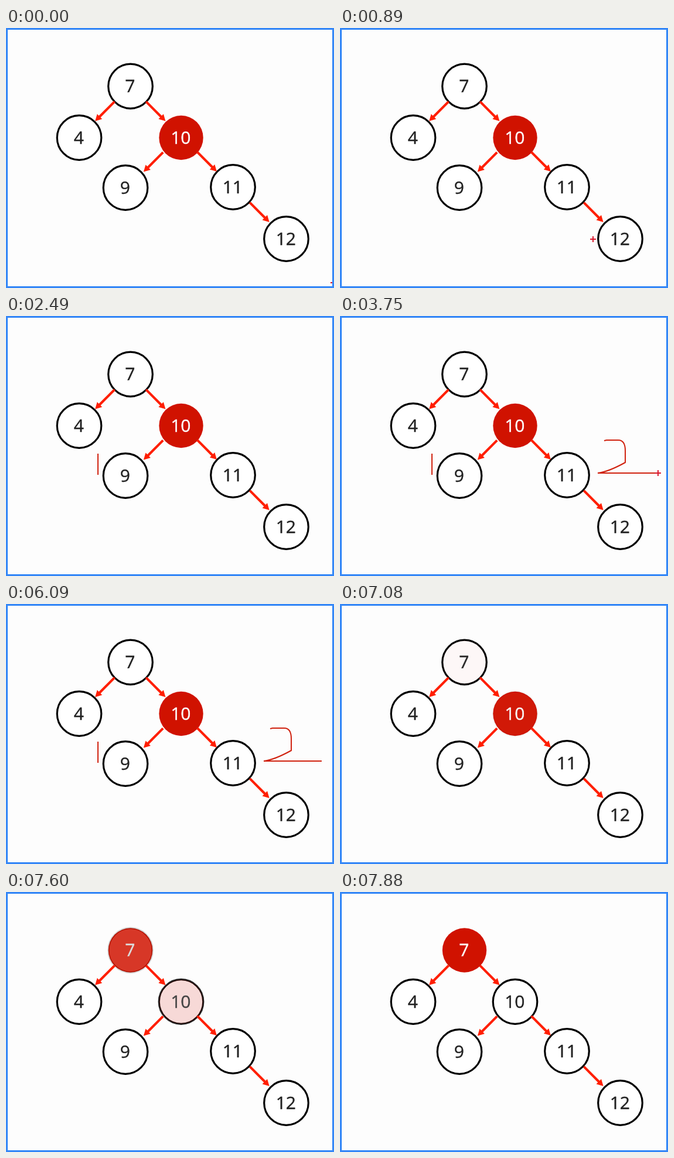
Write an HTML page with a canvas that moves like this. It is 560x442 px and loops after 8000 ms.

```html
<!DOCTYPE html>
<html lang="en">
<head>
<meta charset="utf-8">
<title>Tree rotation</title>
<style>
  html, body { margin: 0; width: 100%; height: 100%; overflow: hidden; background: #fdfdfd; }
  canvas { display: block; }
</style>
</head>
<body>
<canvas id="stage" width="560" height="442"></canvas>
<script>
const stage = document.getElementById('stage');
const ctx = stage.getContext('2d');
const layer = stage.cloneNode();
const back = layer.getContext('2d');

const LOOP = 8000, TICK = 50, WIPE = 7080;
const RED = '#d01200', ARROW = '#ff1e00', INK = '#d0220f';

const node = (label, x, y, parent) => ({ label, x, y, parent });
const seven = node('7', 212.5, 99);
const four = node('4', 125, 186.5, seven);
const ten = node('10', 299, 186.5, seven);
const nine = node('9', 204, 271.5, ten);
const eleven = node('11', 387.5, 270.5, ten);
const twelve = node('12', 478.5, 358.5, eleven);
const nodes = [seven, four, ten, nine, eleven, twelve];

function stroke(from, to, d) {
  const path = document.createElementNS('http://www.w3.org/2000/svg', 'path');
  path.setAttribute('d', d);
  return { from, to, shape: new Path2D(d), length: path.getTotalLength() };
}
const strokes = [
  stroke(2150, 2490, 'M157 234V270'),
  stroke(3150, 3710, 'M451 212L455 211H475Q487 211 487 229V249Q458 265 440 267H539')
];

// the cursor is visible from show to hide and glides from a to b around via
const glides = [
  { show: 0, start: 550, end: 1500, hide: 1500, a: [559, 433], via: [345, 305], b: [216, 241] },
  { show: 1500, start: 1500, end: 2050, hide: 2200, a: [216, 241], via: [180, 236], b: [157, 234] },
  { show: 2630, start: 2850, end: 3150, hide: 3150, a: [157, 271], via: [250, 20], b: [451, 212] },
  { show: 3750, start: 3750, end: 6090, hide: 6090, a: [543, 267], via: [543, 267], b: [543, 267] },
  { show: 6240, start: 6240, end: 6750, hide: 6750, a: [542, 267], via: [430, 430], b: [324, 167] }
];

const progress = (t, from, to) => Math.max(0, Math.min(1, (t - from) / (to - from)));

function drawNode({ label, x, y }, active) {
  ctx.beginPath();
  ctx.arc(x, y, active ? 37.7 : 37.8, 0, Math.PI * 2);
  ctx.fillStyle = active ? RED : '#fff';
  ctx.fill();
  if (!active) {
    ctx.lineWidth = 3.2;
    ctx.strokeStyle = '#000';
    ctx.stroke();
  }
  ctx.fillStyle = ctx.strokeStyle = active ? '#fff' : '#222';
  ctx.lineWidth = 0.4;
  ctx.fillText(label, x - 0.7, y + 10);
  ctx.strokeText(label, x - 0.7, y + 10);
}

// every link is a diagonal arrow centred between parent and child
function drawLink({ x, y, parent }) {
  const side = Math.sign(x - parent.x);
  ctx.save();
  ctx.translate((x + parent.x) / 2, (y + parent.y) / 2 - 1);
  ctx.rotate(side > 0 ? Math.PI / 4 : Math.PI * 3 / 4);
  ctx.fillStyle = ARROW;
  ctx.fillRect(-23.5, -2.1, 39, 4.2);
  ctx.beginPath();
  ctx.moveTo(23.5, 0);
  ctx.lineTo(12.5, -6);
  ctx.lineTo(12.5, 6);
  ctx.fill();
  ctx.restore();
}

function drawTree(active) {
  ctx.fillStyle = '#fdfdfd';
  ctx.fillRect(0, 0, 560, 442);
  ctx.font = '30px "Open Sans", "Noto Sans", sans-serif';
  ctx.textAlign = 'center';
  nodes.forEach(n => drawNode(n, n === active));
  nodes.filter(n => n.parent).forEach(drawLink);
}

function drawFade(k) {
  drawTree(ten);
  back.drawImage(stage, 0, 0);
  drawTree(seven);
  ctx.globalAlpha = 1 - k;
  ctx.drawImage(layer, 0, 0);
  ctx.globalAlpha = 1;
}

function drawStroke({ from, to, shape, length }, t) {
  const drawn = length * progress(t, from, to);
  if (!drawn) return;
  ctx.save();
  ctx.setLineDash([drawn, length + 1]);
  ctx.lineWidth = 2;
  ctx.strokeStyle = INK;
  ctx.stroke(shape);
  ctx.restore();
}

function drawCursor(t) {
  const g = glides.find(g => t >= g.show && t < g.hide);
  if (!g) return;
  const k = progress(Math.floor(t / TICK) * TICK, g.start, g.end);
  const [x, y] = [0, 1].map(i => Math.round(
    (1 - k) ** 2 * g.a[i] + 2 * k * (1 - k) * g.via[i] + k * k * g.b[i]));
  ctx.fillStyle = '#d9182c';
  ctx.fillRect(x - 5, y - 1, 10, 2);
  ctx.fillRect(x - 1, y - 5, 2, 10);
}

function draw(t) {
  if (t < WIPE) {
    drawTree(ten);
    strokes.forEach(s => drawStroke(s, t));
  } else {
    drawFade(progress(t, WIPE - 20, WIPE + 620));
  }
  drawCursor(t);
  ctx.lineWidth = 3;
  ctx.strokeStyle = '#3487f7';
  ctx.strokeRect(1.5, 1.5, 557, 439);
}

function loop() {
  draw(performance.now() % LOOP);
  requestAnimationFrame(loop);
}
loop();
</script>
</body>
</html>
```
